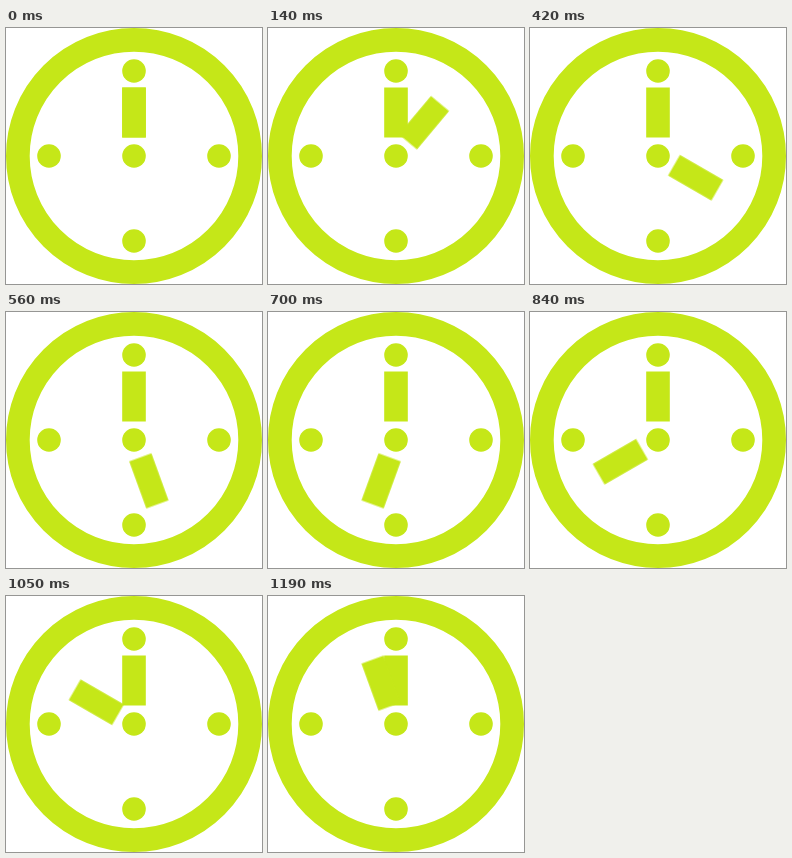
Recreate the animation shown at these times as an HTML page. Size 256 px wide and 256 px high, loop 1260 ms.

```html
<!DOCTYPE html>
<html lang="en">
<head>
<meta charset="utf-8">
<title>Clock</title>
<style>
  html, body { margin: 0; width: 100%; height: 100%; overflow: hidden; background: #fff; }
  svg { display: block; width: 100vw; height: 100vh; fill: #c5e718; }
  .face { filter: blur(.45px); }
  .ring { fill: none; stroke: #c5e718; stroke-width: 23.7; }
  /* 18 hard steps of 20 degrees, 70 ms each */
  .hour { transform-origin: 128px 128px; animation: turn 1260ms steps(18, end) infinite; }
  @keyframes turn {
    from { transform: rotate(0deg); }
    to { transform: rotate(360deg); }
  }
</style>
</head>
<body>
<svg viewBox="0 0 256 256">
  <defs>
    <rect id="hand" x="116.2" y="59.5" width="23.6" height="50"/>
    <circle id="dot" r="11.8"/>
  </defs>
  <g class="face">
    <circle class="ring" cx="128" cy="128" r="116.15"/>
    <use href="#dot" x="128" y="43"/>
    <use href="#dot" x="213" y="128"/>
    <use href="#dot" x="128" y="213"/>
    <use href="#dot" x="43" y="128"/>
    <use href="#dot" x="128" y="128"/>
    <use href="#hand"/>
    <g class="hour"><use href="#hand"/></g>
  </g>
</svg>
</body>
</html>
```
